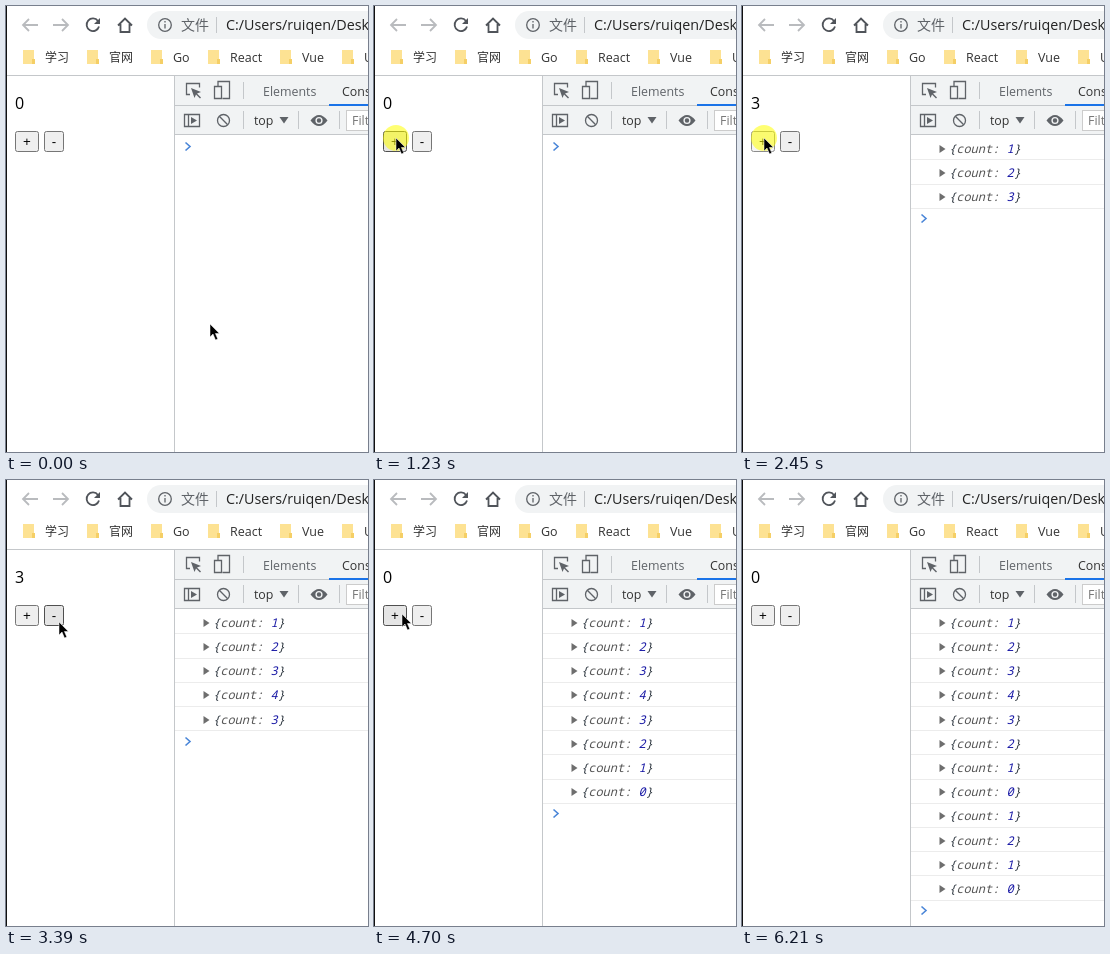
Animation of 362 by 446 pixels, one loop 7010 ms. Source, as an HTML page:

```html
<!DOCTYPE html>
<html lang="zh">
<head>
<meta charset="utf-8">
<title>Counter</title>
<style>
html, body { margin: 0; width: 100%; height: 100%; overflow: hidden; background: #fff; }
svg { display: block; width: 362px; height: 446px; font: 12.4px "Open Sans", "Noto Sans CJK SC", sans-serif; fill: #333; }
.line { fill: none; stroke: #5f6368; stroke-width: 1.3; }
.nav { fill: none; stroke: #50545a; stroke-width: 1.8; }
.off { stroke: #b9bbbe; }
.sep { fill: none; stroke: #c4c7ca; }
.grey { fill: #5f6368; }
.cjk { font-family: "Noto Sans CJK SC", sans-serif; }
.btn rect { y: 125.5px; height: 20px; rx: 2px; fill: #efefef; stroke: #767676; }
.btn.hover rect { fill: #e5e5e5; stroke: #4f4f4f; }
.btn.down rect { fill: #f5f5f5; stroke: #8d8d8d; }
.btn text { font: 13.33px "Liberation Sans", sans-serif; text-anchor: middle; fill: #000; }
.row text { font: italic 12px "Noto Sans Mono", monospace; white-space: pre; fill: #303942; }
.row .key { fill: #565656; }
.row .num { fill: #1a1aa6; }
</style>
</head>
<body>
<svg viewBox="0 0 362 446">
  <!-- browser bar -->
  <rect x="141" y="5" width="240" height="28" rx="14" fill="#f1f3f4"/>
  <path id="arrow" class="nav off" d="M32 19H17m6 -6l-6 6l6 6"/>
  <use href="#arrow" transform="rotate(180 39.500 19)"/>
  <path class="nav" d="M92 15a6.300 6.300 0 1 0 1 5.500M112 19.500l7 -7l7 7M114.500 18v8h9v-8"/>
  <path d="M94 12v6h-6z" fill="#50545a"/>
  <circle class="line" cx="159" cy="19" r="6.300"/>
  <path class="line" d="M159 18v4.500m0 -7.500v1.500"/>
  <text class="grey cjk" x="175" y="24" font-size="14">文件</text>
  <path class="sep" d="M210.500 11v16M0 69.500h362"/>
  <text x="220" y="24" font-size="14.300" fill="#222">C:/Users/ruiqen/Desk</text>
  <g id="marks"></g>

  <!-- page -->
  <text id="count" x="9" y="103" font-size="16" fill="#000">0</text>
  <g class="btn" id="plus"><rect x="9.500" width="23"/><text x="21" y="140">+</text></g>
  <g class="btn" id="minus"><rect x="38.500" width="19"/><text x="48" y="140">-</text></g>

  <!-- developer tools -->
  <rect x="169" y="70" width="193" height="58" fill="#f1f3f4"/>
  <path class="sep" d="M168.500 70v376M169 99.500h193M169 128.500h193M237.500 76v17M237.500 105v18M292.500 105v18M333.500 105v18"/>
  <path class="line" d="M184 88.500h-3.500v-11h13v4M212 80v-4.500h11.500v17h-7M208.500 80.500h7v12h-7z"/>
  <path class="grey" d="M185 82l10 4l-4 1.500l4 4l-1 1l-4 -4l-1.500 3.500z"/>
  <text class="grey" x="257" y="90">Elements</text>
  <text x="336" y="90">Console</text>
  <rect x="323" y="98" width="39" height="2" fill="#1a73e8"/>
  <path class="line" d="M178.500 108.500h15v12h-15zm4 0v12"/>
  <path class="grey" d="M185 111l6 3.500l-6 3.500z"/>
  <circle class="line" cx="217.500" cy="114.500" r="6"/>
  <path class="line" d="M213.300 110.300l8.400 8.400"/>
  <text x="248" y="119">top</text>
  <path class="grey" d="M273.500 111h9l-4.500 6.500z"/>
  <path class="grey" d="M304.500 114.500q8.500 -11 17 0q-8.500 11 -17 0"/>
  <circle class="grey" cx="313" cy="114.500" r="2.900" stroke="#f1f3f4" stroke-width="1.400"/>
  <rect x="340.500" y="104.500" width="40" height="20" fill="#fff" stroke="#ccc"/>
  <text x="346" y="119" fill="#757575">Filter</text>
  <g id="rows"></g>
  <path id="prompt" d="M179.500 136.500l4.500 4l-4.500 4" fill="none" stroke="#4a86d8" stroke-width="1.600"/>

  <circle id="glow" r="13" fill="#ff0"/>
  <path id="cursor" d="M0 0v13l3 -3l2.500 6l2.300 -1l-2.400 -5.500h4z" fill="#000" stroke="#fff" stroke-width=".5"/>
  <path d="M.5 0v446" stroke="#111"/>
</svg>
<script>
const LOOP = 7010, STEP = 68, PITCH = 24.2;
const $ = id => document.getElementById(id);

// Each leg moves the pointer, then may click a few times at an even pace.
const legs = [
  { start: 70, end: 70, x: 135, y: 210 },
  { start: 210, end: 340, x: 62, y: 150 },
  { start: 480, end: 830, x: 22, y: 132, first: 1365, gap: 405, times: 4, change: 1 },
  { start: 2720, end: 3060, x: 53, y: 142, first: 3250, gap: 347, times: 4, change: -1 },
  { start: 4430, end: 4700, x: 22, y: 132, first: 4910, gap: 200, times: 2, change: 1 },
  { start: 5180, end: 5310, x: 44, y: 137, first: 5450, gap: 200, times: 2, change: -1 },
  { start: 5790, end: 6210, x: 343, y: 479 }
];
const clicks = legs.flatMap(({ first, gap, times = 0, change }) =>
  Array.from({ length: times }, (_, i) => ({ up: first + i * gap, change })));

const rowY = i => Math.floor(i * PITCH + 0.3);
const moveTo = (id, x, y) => $(id).setAttribute("transform", `translate(${Math.round(x)} ${Math.round(y)})`);

let markX = 17;
for (const name of ["学习", "官网", "Go", "React", "Vue", "UI"]) {
  const cjk = name > "z";
  $("marks").insertAdjacentHTML("beforeend", `
    <path d="M${markX} 44h11v9h1v5h-12z" fill="#fde293"/>
    <path d="M${markX + 9} 58v-5h3v5z" fill="#f5cf66"/>
    <text class="${cjk ? "cjk" : ""}" x="${markX + 22}" y="56" font-size="${cjk ? 12 : 12.5}">${name}</text>`);
  markX += 40 + Math.round($("marks").lastElementChild.getComputedTextLength());
}

let total = 0;
$("rows").innerHTML = clicks.map(({ change }, i) => {
  const y = rowY(i);
  total += change;
  return `<g class="row">
    <path d="M197.500 ${y + 139}l6 4l-6 4z" fill="#6e6e6e"/>
    <text x="207" y="${y + 147}">{<tspan class="key">count: </tspan><tspan class="num">${total}</tspan>}</text>
    <path d="M169 ${Math.floor(153.8 + i * PITCH) + 0.5}h193" stroke="#ececec"/></g>`;
}).join("");
const rows = [...$("rows").children];

function pointer(t) {
  let x = 204, y = 318;
  for (const leg of legs) {
    if (t < leg.start) break;
    const steps = Math.round((leg.end - leg.start) / STEP) + 1;
    const part = Math.min(1, (Math.floor((t - leg.start) / STEP) + 1) / steps);
    x += (leg.x - x) * part;
    y += (leg.y - y) * part;
  }
  return [x, y];
}

function setButton(id, left, right, x, y, down) {
  const over = x >= left && x <= right && y >= 125 && y <= 146;
  $(id).setAttribute("class", "btn" + (over ? down ? " down" : " hover" : ""));
}

function draw(now) {
  const t = now % LOOP;
  const [x, y] = pointer(t);
  const done = clicks.filter(c => t >= c.up);
  const click = clicks.find(c => t >= c.up - 135 && t < c.up + 70);
  const down = click && t >= click.up - 130 && t < click.up;

  $("count").textContent = done.reduce((sum, c) => sum + c.change, 0);
  rows.forEach((row, i) => row.style.display = i < done.length ? "" : "none");
  moveTo("prompt", 0, rowY(done.length));
  setButton("plus", 9, 33, x, y, down);
  setButton("minus", 38, 58, x, y, down);
  moveTo("cursor", x, y);
  moveTo("glow", x, y);
  $("glow").setAttribute("opacity", !click ? 0 : t < click.up ? 0.55 : 0.3);
  requestAnimationFrame(draw);
}
requestAnimationFrame(draw);
</script>
</body>
</html>
```
